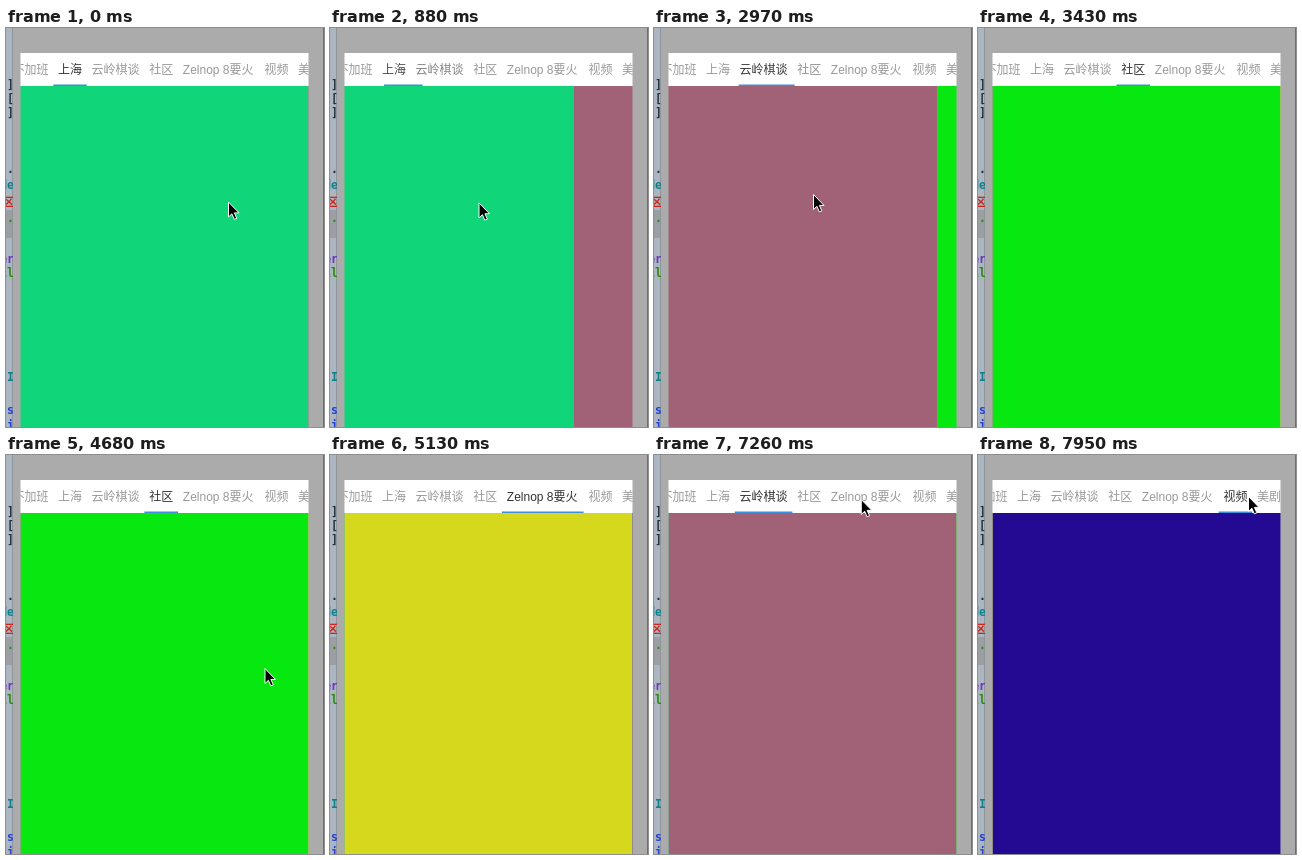
Recreate the animation shown at these times as an HTML page. Size 318 px wide and 399 px high, loop 8000 ms.

```html
<!DOCTYPE html>
<html lang="zh-CN">
<head>
<meta charset="utf-8">
<style>
html, body { margin: 0; width: 100%; height: 100%; overflow: hidden; background: #ababab; }
svg { display: block; }
.tab { font: 12px "Liberation Sans", "Noto Sans CJK SC", "Noto Sans CJK", sans-serif; }
.code { font: bold 11.5px "DejaVu Sans Mono", "Noto Sans CJK SC", monospace; text-anchor: end; }
</style>
</head>
<body>
<svg width="318" height="399" viewBox="0 0 318 399">
  <defs>
    <clipPath id="editor"><rect width="7" height="399"/></clipPath>
    <clipPath id="phone"><rect x="14.5" y="25" width="288" height="374"/></clipPath>
  </defs>
  <rect width="318" height="399" fill="#ababab"/>
  <rect width="7" height="399" fill="#acb6c0"/>
  <rect y="182" width="7" height="28" fill="#9b9fa3"/>
  <rect x="6" width="1" height="399" fill="#8f969c"/>
  <g id="code" class="code" clip-path="url(#editor)"></g>
  <rect x="317" width="1" height="399" fill="#6e6e6e"/>
  <g clip-path="url(#phone)">
    <rect x="14" y="25" width="289" height="33" fill="#fff"/>
    <g id="pages"></g>
    <g id="bar" class="tab"><rect id="line" y="56.5" height="1.5" fill="#3d8edb"/></g>
  </g>
  <path id="cursor" d="M0 0V15L3.4 11.8L5.8 17.3L8.3 16.3L5.9 10.9H10.5Z" fill="#000" stroke="#fff"/>
</svg>
<script>
const LOOP = 8000, LEFT = 14.5, WIDTH = 288, FONT = 12, GAP = 9.6;
const $ = id => document.getElementById(id);

function add(parent, tag, attrs, text = "") {
  const el = document.createElementNS("http://www.w3.org/2000/svg", tag);
  for (const k in attrs) el.setAttribute(k, attrs[k]);
  el.textContent = text;
  return parent.appendChild(el);
}

let nextX = 6.4;
const tabs = [
  ["不加班", "#12d67a"],
  ["上海", "#10d679"],
  ["云岭棋谈", "#a16277"],
  ["社区", "#06e80f"],
  ["Zelnop 8要火", "#d6d81e"],
  ["视频", "#240a92"],
  ["美剧", "#240a92"]
].map(([label, fill]) => {
  const x = nextX;
  const w = FONT * (label.replace(/[ -~]/g, "").length + label.replace(/[^ -~]/g, "").length / 2);
  nextX += w + GAP;
  return {
    x, w,
    text: add($("bar"), "text", { x, y: 46 }, label),
    page: add($("pages"), "rect", { y: 58, width: WIDTH, height: 341, fill })
  };
});

// line ends peeking out of the editor, by colour: text and baseline
const code = {
  "#22303c": "] 61 [ 75 ] 89 . 145",
  "#0f7f8c": "de 161 I 353",
  "#c8281e": "区 178",
  "#2a8a10": ". 194 ll 249",
  "#6a35c0": "er 235",
  "#2340d8": "s 386 i 401"
};
for (const fill in code)
  for (const [, s, y] of code[fill].matchAll(/(\S+) (\d+)/g))
    add($("code"), "text", { x: 8, y, fill }, s);

const linear = u => u;
const smooth = u => u * u * (3 - 2 * u);
const flick = u => 1 - (1 - u) ** 4;
const progress = (t, from, to) => Math.min(1, Math.max(0, (t - from) / (to - from || 1)));
const mix = (a, b, u) => a + (b - a) * u;

// page position: start, end, destination, easing
const swipes = [
  [640, 1470, 2, smooth],
  [1500, 1730, 2.09, smooth],
  [2430, 2960, 2.067, linear],
  [2990, 3430, 3, flick],
  [4800, 5130, 4, flick],
  [6740, 6740, 2, () => 1],
  [7660, 7660, 5, () => 1]
];
const pagePos = t => swipes.reduce((p, [from, to, dest, ease]) =>
  t < from ? p : mix(p, dest, ease(progress(t, from, to))), 1);

// pointer: appears and starts, stops, disappears, first and last place
const strokes = [
  [0, 0, 60, [222, 173.5], [222, 173.5]],
  [480, 640, 640, [222, 173.5], [222, 173.5]],
  [640, 1250, 1250, [222, 173.5], [9, 176]],
  [2430, 2960, 3030, [153, 166], [159, 166]],
  [3790, 3950, 3950, [107, 163], [318, 212]],
  [4340, 4680, 4850, [314, 213], [258.5, 213]],
  [5850, 6320, 7050, [-4, 74], [110, 48.5]],
  [7050, 7420, LOOP, [110, 48.5], [270, 41]]
];

function draw(t) {
  const pos = pagePos(t);
  tabs.forEach(({ text, page }, i) => {
    page.setAttribute("x", LEFT + WIDTH * (i - pos));
    const c = Math.round(mix(153, 51, Math.max(0, 1 - Math.abs(pos - i))));
    text.setAttribute("fill", `rgb(${c},${c},${c})`);
  });

  const i = Math.floor(pos), f = pos - i, a = tabs[i], b = tabs[i + 1];
  $("line").setAttribute("x", mix(a.x, b.x, f) - GAP / 2);
  $("line").setAttribute("width", mix(a.w, b.w, f) + GAP);
  const scroll = 13 * smooth(progress(t, 7620, 7950));
  $("bar").setAttribute("transform", `translate(${-scroll})`);

  const stroke = strokes.find(([from, , hide]) => t >= from && t < hide);
  $("cursor").setAttribute("visibility", stroke ? "visible" : "hidden");
  if (stroke) {
    const [from, to, , p, q] = stroke, u = smooth(progress(t, from, to));
    $("cursor").setAttribute("transform", `translate(${mix(p[0], q[0], u) + 0.5} ${mix(p[1], q[1], u) + 0.5})`);
  }
}

const start = performance.now();
function tick() {
  draw((performance.now() - start) % LOOP);
  requestAnimationFrame(tick);
}
tick();
</script>
</body>
</html>
```
